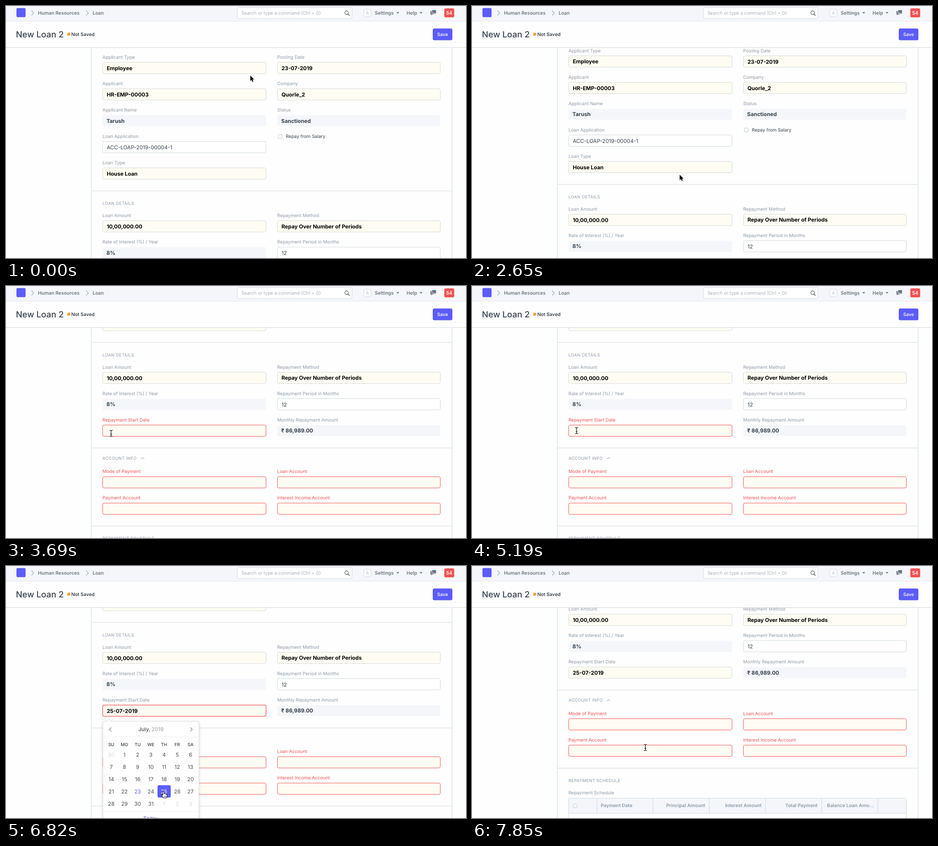
An HTML page that plays this animation: 1011 by 554 pixels, repeating every 8000 ms.

```html
<!DOCTYPE html>
<html lang="en">
<head>
<meta charset="utf-8">
<title>New Loan</title>
<style>
html, body { margin: 0; width: 100%; height: 100%; overflow: hidden; background: #fefefe; }
svg { display: block; width: 1011px; height: 554px; }
text { font-family: Inter, "Noto Sans", sans-serif; text-rendering: geometricPrecision; white-space: pre; }
</style>
</head>
<body>
<svg id="stage" viewBox="0 0 1011 554" xmlns="http://www.w3.org/2000/svg"></svg>
<script>
const LOOP = 8000;
const C = {
  paper: '#fefefe', bar: '#f4f6fa', line: '#d1d8dd', label: '#8d99a6', nav: '#6c7680',
  ink: '#36414c', red: '#f25252', blue: '#5c5cf7', cream: '#fffdf3'
};

// y is the middle of the capital letters
function text(x, y, str, size, fill, weight = 400, extra = '') {
  const base = (y + size * 0.3635).toFixed(2);
  return `<text x="${x}" y="${base}" font-size="${size}" fill="${fill}" font-weight="${weight}" ${extra}>${str}</text>`;
}
function rect(x, y, w, h, fill, stroke = 'none', r = 0, extra = '') {
  return `<rect x="${x}" y="${y}" width="${w}" height="${h}" rx="${r}" fill="${fill}" stroke="${stroke}" ${extra}/>`;
}
function path(d, stroke, width = 1, fill = 'none', extra = '') {
  return `<path d="${d}" stroke="${stroke}" stroke-width="${width}" fill="${fill}" ${extra}/>`;
}
const MIDDLE = 'text-anchor="middle"';
const END = 'text-anchor="end"';

// kind: input, select, plain, static, error
function field(col, y, name, kind, value = '', id = '') {
  const x = col ? 596.5 : 212.5, w = col ? 358 : 359, mid = y + 24;
  const bad = kind === 'error', fixed = kind === 'static', plain = kind === 'plain';
  const tag = s => id ? `id="${id}${s}"` : '';
  let out = text(x - 0.5, y, name, 10.03, bad ? C.red : C.label, 400, tag('Label'));
  out += fixed
    ? rect(x, mid - 12.3, w, 24.6, C.bar, 'none', 3)
    : rect(x, mid - 12.4, w, 24.8, plain ? '#fff' : C.cream, bad ? C.red : C.line, 3.3, tag('Box'));
  const drop = fixed || kind === 'select' ? 0 : 0.5;
  const tx = x + (fixed ? 8.3 : 8.9);
  out += text(tx, mid + drop, value, plain ? 11.7 : 11.75,
    fixed || plain ? C.ink : '#000', plain ? 400 : 700, tag('Value'));
  return out;
}
const section = (y, name) => text(212, y, name, 9.2, C.label, 400, 'letter-spacing="0.4"');
const rule = y => path(`M187.5 ${y}H980.5`, C.line);

function form() {
  let s = path('M187.5 0V1200M980.5 0V1200', C.line);
  s += field(0, 112.3, 'Applicant Type', 'select', 'Employee');
  s += field(0, 170.3, 'Applicant', 'input', 'HR-EMP-00003');
  s += field(0, 228.3, 'Applicant Name', 'static', 'Tarush');
  s += field(0, 286.3, 'Loan Application', 'plain', 'ACC-LOAP-2019-00004-1');
  s += field(0, 344.3, 'Loan Type', 'input', 'House Loan');
  s += field(1, 112.3, 'Posting Date', 'input', '23-07-2019');
  s += field(1, 170.3, 'Company', 'input', 'Quorle_2');
  s += field(1, 228.3, 'Status', 'static', 'Sanctioned');
  s += rect(598.5, 282.5, 8.5, 8.5, '#fff', '#bcc4cc', 2);
  s += text(615, 286.8, 'Repay from Salary', 10.03, C.ink);
  s += rule(406.5) + section(433.8, 'LOAN DETAILS');
  s += field(0, 460.5, 'Loan Amount', 'input', '10,00,000.00');
  s += field(0, 518.5, 'Rate of Interest (%) / Year', 'static', '8%');
  s += field(0, 576.5, 'Repayment Start Date', 'error', '', 'start');
  s += field(1, 460.5, 'Repayment Method', 'select', 'Repay Over Number of Periods');
  s += field(1, 518.5, 'Repayment Period in Months', 'plain', '12');
  s += field(1, 576.5, 'Monthly Repayment Amount', 'static', '₹ 86,989.00');
  s += rule(638.6) + section(661, 'ACCOUNT INFO') + path('M296.3 663.2L300 659.2 303.7 663.2', '#a9b3bd', 1.1);
  s += field(0, 690.1, 'Mode of Payment', 'error');
  s += field(0, 748.1, 'Payment Account', 'error');
  s += field(1, 690.1, 'Loan Account', 'error');
  s += field(1, 748.1, 'Interest Income Account', 'error');
  s += rule(810.4) + section(837.3, 'REPAYMENT SCHEDULE');
  s += text(212, 864, 'Repayment Schedule', 10.03, C.label);
  return s + table();
}
function table() {
  let s = rect(212.5, 876.5, 742, 120, '#fff', C.line, 2) + rect(213, 877, 741, 32.5, C.bar);
  s += path('M212.5 909.5H954.5', C.line);
  for (const x of [274.5, 397.5, 521.5, 645, 768.5, 892]) s += path(`M${x} 877V909.5`, C.line);
  s += rect(222.5, 888.8, 8.2, 8.2, '#fff', '#bcc4cc', 2);
  const head = (x, str, extra) => text(x, 892, str, 10.35, C.label, 600, extra);
  s += head(283, 'Payment Date');
  s += head(512.5, 'Principal Amount', END) + head(636.5, 'Interest Amount', END);
  s += head(759.5, 'Total Payment', END) + head(883, 'Balance Loan Amo...', END);
  return s;
}

function header() {
  const caret = x => path(`M${x - 3.2} 13.6h6.4l-3.2 3.4z`, 'none', 0, C.nav);
  const crumb = x => path(`M${x} 10.2l5 5.3-5 5.3`, '#9ba5af', 1.1);
  const nav = (x, y, str) => text(x, y, str, 10.4, C.nav, 600);
  let s = rect(0, 0, 1011, 33, C.bar) + rect(0, 33, 1011, 58.5, C.paper);
  s += path('M0 33.4H1011', '#e3e8ec') + path('M0 91.5H1011', C.line);
  s += rect(23, 4.5, 20, 20, C.blue, 'none', 2.5);
  s += crumb(56) + nav(70.3, 15.6, 'Human Resources') + crumb(176) + nav(190.3, 15.6, 'Loan');
  s += rect(508.5, 3.2, 252, 24.3, '#fff', C.line, 3.3);
  s += text(517.4, 15.6, 'Search or type a command (Ctrl + G)', 10.03, '#a6b0ba');
  s += '<circle cx="748.6" cy="14.8" r="3.9" fill="none" stroke="#4c5661" stroke-width="1.2"/>';
  s += path('M751.5 17.8l3.4 3.5', '#4c5661', 1.5);
  s += rect(786.5, 7, 15.5, 16, '#fff', C.line, 2) + text(794.2, 15.2, 'A', 10.4, '#b8c2cc', 400, MIDDLE);
  s += nav(810.5, 15, 'Settings') + caret(861) + nav(880.3, 15, 'Help') + caret(912);
  s += path('M936.5 9h8.6v6.6h-1.2v2.6l-2.6-2.6h-4.8z', 'none', 0, C.nav);
  s += path('M932.8 11.2h2.8v5.2h4.6v1.8h-3.6l-2.4 2.3v-2.3h-1.4z', 'none', 0, C.nav);
  s += rect(963.3, 5.2, 21.7, 19.8, C.red, 'none', 3.3) + text(974.1, 15.2, '54', 10.4, '#fff', 600, MIDDLE);
  s += text(21.8, 62.2, 'New Loan 2', 18.6, C.ink, 500);
  s += '<circle cx="138" cy="62" r="3.5" fill="#f9a033"/>';
  s += text(143.4, 62.2, 'Not Saved', 10.35, C.ink, 600);
  s += rect(938.5, 50, 42, 24.8, C.blue, '#4f4fee', 2.6) + text(959.5, 62.2, 'Save', 10.1, '#fff', 500, MIDDLE);
  return s;
}

// calendar grid
const COL = 29.05, ROW = 27, GX = 231.3, GY = 414.5;
const cellBox = (i, id) => rect(GX + i % 7 * COL - 14.5, GY + Math.floor(i / 7) * ROW - 13.4,
  COL, ROW, 'none', 'none', 3.3, `id="${id}"`);
const PICKED = 25;
function picker() {
  let s = rect(213, 341.3, 211, 250, '#fff', '#d5dade', 3.3, 'filter="url(#soft)"');
  s += path('M219.8 341.8L226 335.8 232.2 341.8', '#d5dade', 1, '#fff');
  s += path('M231.3 354.8L227 359.2 231.3 363.6M405 354.8L409.3 359.2 405 363.6', '#8b8b8b', 1.3);
  s += text(318.5, 358.6, 'July, <tspan fill="#9c9c9c" font-weight="400">2019</tspan>', 11.5, '#4a4a4a', 500, MIDDLE);
  s += path('M213.5 375.5H423.5M213.5 540H423.5', '#efefef');
  'SU MO TU WE TH FR SA'.split(' ').forEach((d, i) => {
    s += text(GX + i * COL, 393, d, 9.6, C.ink, 500, MIDDLE);
  });
  s += rect(0, 0, COL, ROW, '#f0f0f0', 'none', 3.3, 'id="hover"') + cellBox(PICKED, 'picked');
  for (let i = 0; i < 35; i++) {
    const other = i < 1 || i > 31, day = i < 1 ? 30 : i > 31 ? i - 31 : i;
    const fill = other ? '#d8d8d8' : i === 23 ? C.blue : '#4a4a4a';
    s += text(GX + i % 7 * COL, GY + Math.floor(i / 7) * ROW, day, 11.7, fill, 400,
      MIDDLE + (i === PICKED ? ' id="pickedDay"' : ''));
  }
  return s + text(318.5, 554.6, 'Today', 11.7, C.blue, 400, MIDDLE);
}

function cursors() {
  const beam = 'M-3.2-6.8Q0-6.8 0-4.6V4.6Q0 6.8-3.2 6.8M3.2-6.8Q0-6.8 0-4.6M0 4.6Q0 6.8 3.2 6.8M-1.8 1.6H1.8';
  const hand = 'M-1.4 8V1Q-1.4-.3 0-.3Q1.4-.3 1.4 1V5Q3.4 4.2 3.9 5.6Q5.7 4.9 6.2 6.4Q8 6 8 8V10.5' +
    'Q7.6 12.5 6.8 14.5H0Q-1 12.5-2.6 11Q-4.8 8.6-4.6 7.6Q-3.8 6.4-1.4 8.6';
  return '<g id="arrow">' +
    path('M0 0V11.7L2.7 9.2 4.6 13.5 6.6 12.6 4.8 8.4H8.4Z', '#fff', 1.8, '#000',
      'paint-order="stroke" stroke-linejoin="round" filter="url(#faint)"') + '</g>' +
    '<g id="beam">' + path(beam, '#fff', 2.6, 'none', 'opacity=".8"') + path(beam, '#111', 1.2) + '</g>' +
    '<g id="hand">' + path(hand + 'Z', '#111', 1.1, '#fff', 'stroke-linejoin="round"') +
    path('M1.8 10V12.6M3.7 10V12.6M5.6 10V12.6', '#111', 0.8) + '</g>';
}

document.getElementById('stage').innerHTML = `<defs>
<clipPath id="view"><rect x="0" y="92" width="1011" height="462"/></clipPath>
<filter id="soft" x="-10%" y="-10%" width="120%" height="120%"><feDropShadow dx="0" dy="3" stdDeviation="3" flood-opacity=".16"/></filter>
<filter id="faint" x="-50%" y="-30%" width="220%" height="180%"><feDropShadow dx="0" dy="1" stdDeviation=".7" flood-opacity=".3"/></filter>
</defs>
${rect(0, 0, 1011, 554, C.paper)}
<g clip-path="url(#view)"><g id="form">${form()}</g></g>
<g id="picker">${picker()}</g>
${header()}
${cursors()}`;

const $ = id => document.getElementById(id);
const set = (id, attrs) => { for (const a in attrs) $(id).setAttribute(a, attrs[a]); };

// Value of a keyed track: rows of [key, a, b...], linear between rows
function track(rows, k) {
  const n = rows.findIndex(r => r[0] > k);
  if (n < 0) return rows[rows.length - 1].slice(1);
  if (n === 0) return rows[0].slice(1);
  const a = rows[n - 1], b = rows[n], f = (k - a[0]) / (b[0] - a[0]);
  return a.slice(1).map((v, i) => v + (b[i + 1] - v) * f);
}

// The screen refreshes in ticks of nearly 148 ms
const TICKS = [[0, 0], [1470, 10], [2650, 18], [3840, 26], [5190, 35], [6220, 42], [6820, 46], [7850, 53], [8000, 54]];
const POINTER = [
  [0, 537, 153], [1, 548, 161], [3, 640, 208], [5, 748, 272], [6, 767, 289], [7, 754, 287], [8, 713, 274],
  [9, 670, 264], [10, 629, 267], [12, 545, 310], [14, 475, 360], [16, 456.5, 371], [21, 456.5, 371],
  [25, 231, 324], [26, 235, 328], [34, 235, 328], [35, 229.8, 318], [36, 229.8, 318], [39, 285, 420],
  [42, 347.5, 496.5], [43, 346, 495.5], [46, 346, 495.5], [49, 381, 399]
];
const SCROLL = [[17, 0], [18, 14.3], [19, 142], [20, 273.4], [21, 281], [22, 282.5], [50, 282.5], [51, 305], [52, 347], [53, 366]];
const FADE = [[35, 0], [36, 0.4], [37, 0.9], [38, 1], [46, 1], [47, 0.5], [48, 0.08], [49, 0]];

function draw(ms) {
  const k = Math.floor(track(TICKS, ms)[0] + 0.03);
  const [x, y] = track(POINTER, k);
  const [scroll] = track(SCROLL, k);
  const [fade] = track(FADE, k);
  const done = k >= 45, calm = k >= 47;

  set('form', { transform: `translate(0 ${-scroll})` });
  set('startLabel', { fill: done ? C.label : C.red });
  set('startBox', { stroke: calm ? C.line : C.red, 'stroke-width': k >= 36 && !calm ? 1.3 : 1 });
  $('startValue').textContent = done ? '25-07-2019' : '';

  set('picker', {
    opacity: fade, display: fade ? 'inline' : 'none',
    transform: `translate(0 ${(1 - fade) * 7})`
  });
  set('picked', { fill: done ? C.blue : 'none' });
  set('pickedDay', { fill: done ? '#fff' : '#4a4a4a' });
  const c = Math.floor((x - GX + 14.5) / COL), r = Math.floor((y - GY + 13.4) / ROW);
  const over = k >= 37 && k < 45 && r >= 0 && r < 5;
  set('hover', { x: GX + c * COL - 14.5, y: GY + r * ROW - 13.4, display: over ? 'inline' : 'none' });

  const kind = k >= 37 && k <= 46 ? 'hand' : (k >= 25 && k <= 36) || k >= 53 ? 'beam' : 'arrow';
  for (const id of ['arrow', 'beam', 'hand']) {
    set(id, { transform: `translate(${x} ${y})`, display: id === kind ? 'inline' : 'none' });
  }
}
function loop() {
  draw(performance.now() % LOOP);
  requestAnimationFrame(loop);
}
loop();
</script>
</body>
</html>
```
